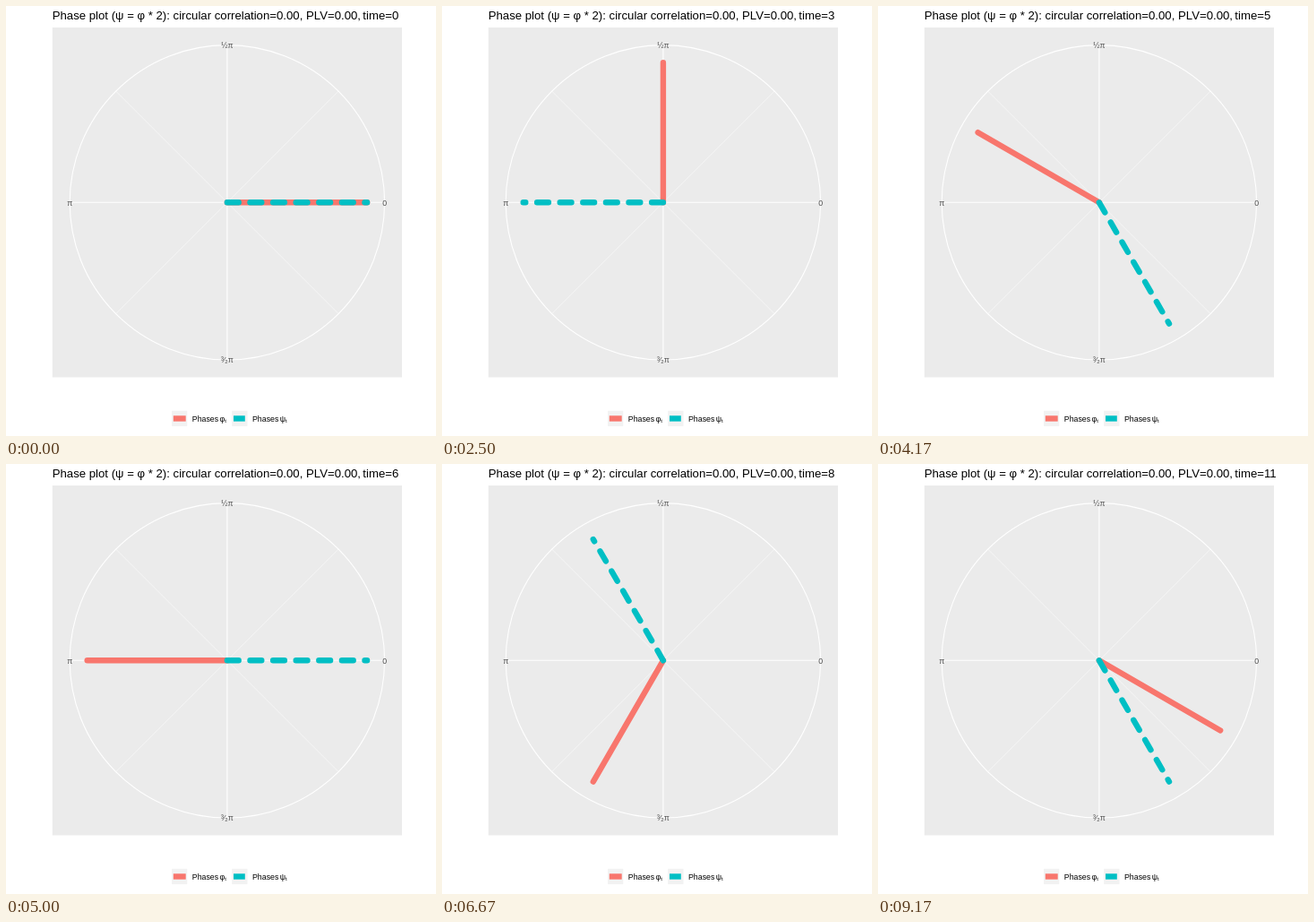
An HTML page for the animation above (10 s loop, 480x480 px).

```html
<!DOCTYPE html>
<html lang="en">
<head>
<meta charset="utf-8">
<title>Phase plot</title>
<style>
  html, body { margin: 0; width: 100%; height: 100%; overflow: hidden; background: #fff; }
  svg { display: block; width: 100vw; height: 100vh; }
  text { font-family: "Liberation Sans", Arial, Helvetica, sans-serif; font-size: 8.8px; }
  .title { font-size: 13.2px; }
  .axis text { fill: #4d4d4d; text-anchor: middle; }
  .sub { font-size: 6.2px; }
  .grid { fill: none; stroke: #fff; stroke-width: 1.07; }
  .minor { stroke-width: .53; }
  .hand { stroke-width: 6.4; stroke-linecap: round; }
  .phi { stroke: #f8766d; }
  .psi { stroke: #00bfc4; }
  .key { stroke-width: 6.4; }
</style>
</head>
<body>
<svg viewBox="0 0 480 480">
  <text class="title" x="51.7" y="15.4">Phase plot (ψ = φ * 2): circular correlation=0.00, PLV=0.00, <tspan x="398.3">time=<tspan id="time">0</tspan></tspan></text>

  <rect x="51.8" y="24" width="390.2" height="390.5" fill="#ebebeb"/>
  <g transform="translate(246.9 219.3)">
    <path class="grid minor" d="M-124.2-124.2 124.2 124.2M-124.2 124.2 124.2-124.2"/>
    <path class="grid" d="M-175.7 0H175.7M0-175.7V175.7"/>
    <circle class="grid" r="175.7"/>
    <g class="axis">
      <text x="175.7" y="3.2">0</text>
      <text x="0" y="-172.5">½π</text>
      <text x="-175.7" y="3.2">π</text>
      <text x="0" y="178.9">³⁄₂π</text>
    </g>
    <path id="phi" class="hand phi" d="M0 0H156.2"/>
    <path id="psi" class="hand psi" d="M0 0H156.2" stroke-dasharray="12.8"/>
  </g>

  <g fill="#f2f2f2">
    <rect x="185" y="451.8" width="17.3" height="17.3"/>
    <rect x="252.2" y="451.8" width="17.3" height="17.3"/>
  </g>
  <path class="key phi" d="M186.8 460.5h13.9"/>
  <path class="key psi" d="M254 460.5h12.8"/>
  <text x="207.8" y="463.7">Phases <tspan x="238.5">φ</tspan><tspan class="sub" dy="1.5">t</tspan></text>
  <text x="275" y="463.7">Phases <tspan x="305.7">ψ</tspan><tspan class="sub" dy="1.5">t</tspan></text>
</svg>
<script>
  const LOOP = 10000, STEPS = 12;
  const [time, phi, psi] = ["time", "phi", "psi"].map(id => document.getElementById(id));
  const turn = (hand, deg) => hand.setAttribute("transform", `rotate(${-deg})`);
  const start = performance.now();
  let shown = -1;

  function draw(now) {
    const t = Math.max(0, now - start) % LOOP;
    // steps begin on whole hundredths of a second
    const step = Math.min(STEPS - 1, Math.floor((t + 4) * STEPS / LOOP));
    if (step !== shown) {
      shown = step;
      const angle = step * 360 / STEPS;
      turn(phi, angle);
      turn(psi, angle * 2);
      time.textContent = step;
    }
    requestAnimationFrame(draw);
  }
  draw(start);
</script>
</body>
</html>
```
